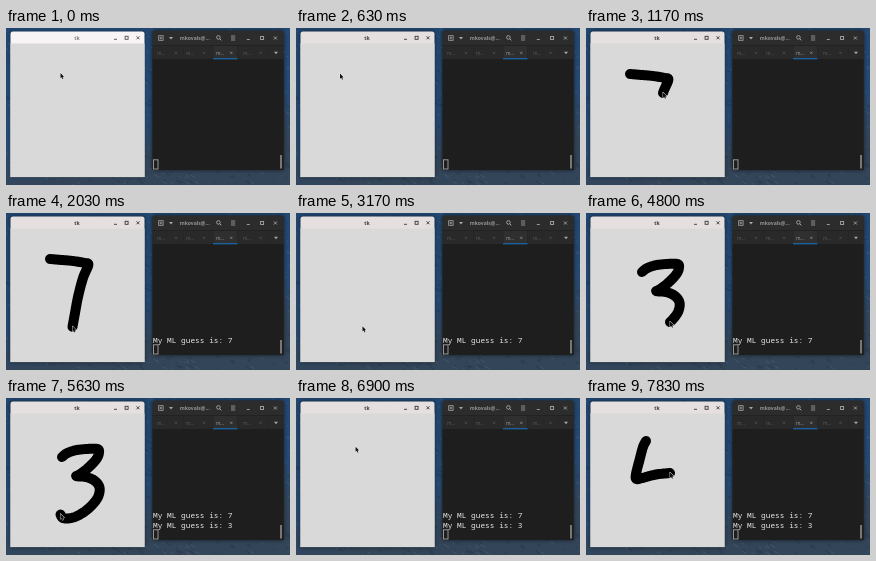
An HTML page with a canvas that plays this animation: 284 by 157 pixels, repeating every 8000 ms.

```html
<!DOCTYPE html>
<html lang="en">
<head>
<meta charset="utf-8">
<title>Digit guess</title>
<style>
html, body { margin: 0; width: 100%; height: 100%; overflow: hidden; background: #1f3a5c; }
canvas { display: block; width: 284px; height: 157px; }
</style>
</head>
<body>
<canvas id="stage"></canvas>
<script>
const W = 284, H = 157, LOOP = 8000, R = 5;
const canvas = document.getElementById('stage');
const dpr = window.devicePixelRatio || 1;
canvas.width = Math.round(W * dpr);
canvas.height = Math.round(H * dpr);
const g = canvas.getContext('2d');
g.scale(dpr, dpr);

const SANS = '"Open Sans", "Noto Sans", sans-serif';
const MONO = '"Noto Sans Mono", "DejaVu Sans Mono", monospace';

const rect = (x, y, w, h, c) => { g.fillStyle = c; g.fillRect(x, y, w, h); };

function line(points, color, width = 1) {
  g.strokeStyle = color;
  g.lineWidth = width;
  g.beginPath();
  points.forEach(([x, y], i) => i ? g.lineTo(x, y) : g.moveTo(x, y));
  g.stroke();
}

function text(s, x, y, font, color, align = 'left') {
  g.font = font;
  g.fillStyle = color;
  g.textAlign = align;
  g.fillText(s, x, y);
}

function triangle(x, y, color) {
  g.fillStyle = color;
  g.beginPath();
  g.moveTo(x - 2, y - 1);
  g.lineTo(x + 2, y - 1);
  g.lineTo(x, y + 1.5);
  g.fill();
}

function cross(x, y, r, color, width) {
  line([[x - r, y - r], [x + r, y + r]], color, width);
  line([[x + r, y - r], [x - r, y + r]], color, width);
}

function windowButtons(xs, y, color) {
  line([[xs[0] - 1.5, y + 1.5], [xs[0] + 1.5, y + 1.5]], color, 0.9);
  g.lineWidth = 0.9;
  g.strokeRect(xs[1] - 1.5, y - 1.5, 3, 3);
  cross(xs[2], y, 1.5, color, 0.9);
}

// Smooth curve through a few points, sampled with running length
function curve(points) {
  const out = [];
  const at = i => points[Math.max(0, Math.min(points.length - 1, i))];
  for (let i = 0; i < points.length - 1; i++) {
    const [a, b, c, d] = [at(i - 1), at(i), at(i + 1), at(i + 2)];
    for (let k = i ? 1 : 0; k <= 10; k++) {
      const u = k / 10;
      const p = [0, 1].map(j => 0.5 * (2 * b[j] + (c[j] - a[j]) * u +
        (2 * a[j] - 5 * b[j] + 4 * c[j] - d[j]) * u * u +
        (3 * b[j] - a[j] - 3 * c[j] + d[j]) * u * u * u));
      const q = out[out.length - 1];
      out.push([p[0], p[1], q ? q[2] + Math.hypot(p[0] - q[0], p[1] - q[1]) : 0]);
    }
  }
  return out;
}

function cut(path, f) {
  const len = path[path.length - 1][2] * f;
  const part = path.filter(p => p[2] <= len);
  const a = part[part.length - 1], b = path[part.length];
  if (b) {
    const u = (len - a[2]) / (b[2] - a[2]);
    part.push([a[0] + (b[0] - a[0]) * u, a[1] + (b[1] - a[1]) * u, len]);
  }
  return part;
}

// Share of n equal steps done at time t between a and b
function steps(t, a, b, n) {
  if (t < a) return 0;
  return t >= b ? 1 : Math.floor((t - a) / (b - a) * n) / n;
}

const strokes = [
  { clear: 3170, legs: [[770, 830, 3, 0.22], [1000, 1430, 13, 1]],
    path: curve([[44, 46], [56, 47], [67, 48], [79, 50], [82.3, 52], [77, 65], [72, 84], [69, 100], [66.5, 113.8]]) },
  { clear: 6230, legs: [[4030, 4830, 23, 0.82], [4870, 5000, 5, 1]],
    path: curve([[56, 59], [61, 55.2], [70, 52.2], [82, 50.9], [91.5, 51], [93, 54.5], [90.5, 61],
      [82, 70], [73.5, 76.5], [70.5, 78.2], [80, 79], [89, 83], [93.6, 90], [91.5, 100], [82.7, 110.3],
      [72.5, 117.3], [64, 120.2], [57, 120], [54.5, 116.5]]) },
  { clear: LOOP, legs: [[7300, 7830, 16, 1]],
    path: curve([[60, 43], [57, 49], [53.5, 62], [50, 76], [50.5, 81], [57, 79.8], [70, 76.5], [84, 75]]) }
];

const moves = [
  { a: 300, b: 630, n: 8, from: [54.5, 45.5], to: [44, 46], pow: 1.5 },
  { a: 3530, b: 3830, n: 10, from: [66.5, 113.8], to: [56, 59], pow: 1.5 },
  { a: 6600, b: 7100, n: 16, from: [54.5, 116.5], to: [60, 43], pow: 3 }
];

function progress(s, t) {
  let f = 0;
  for (const [a, b, n, end] of s.legs) if (t >= a) f += (end - f) * steps(t, a, b, n);
  return f;
}

function pointer(t) {
  let pos = moves[0].from;
  moves.forEach((m, i) => {
    if (t >= m.a) {
      const e = 1 - Math.pow(1 - steps(t, m.a, m.b, m.n), m.pow);
      pos = m.from.map((v, j) => v + (m.to[j] - v) * e);
    }
    const s = strokes[i];
    if (t >= s.legs[0][0]) pos = cut(s.path, progress(s, t)).pop();
  });
  return pos;
}

function drawPointer([x, y]) {
  const shape = [[0, 0], [0, 5.2], [1.2, 4.2], [2.1, 6.2], [2.9, 5.8], [2.1, 3.9], [3.5, 3.7]];
  g.beginPath();
  shape.forEach(([px, py], i) => g[i ? 'lineTo' : 'moveTo'](x + px, y - 0.5 + py));
  g.closePath();
  g.strokeStyle = 'rgba(240,240,240,.75)';
  g.lineWidth = 1;
  g.stroke();
  g.fillStyle = '#111';
  g.fill();
}

function wallpaper() {
  const sky = g.createLinearGradient(0, 0, 30, H);
  sky.addColorStop(0, '#21466f');
  sky.addColorStop(0.7, '#264a73');
  sky.addColorStop(1, '#334559');
  rect(0, 0, W, H, sky);
  let seed = 11;
  const rnd = () => (seed = seed * 16807 % 2147483647) / 2147483647;
  for (let i = 0; i < 700; i++) {
    const x = rnd() * W, y = rnd() * H, l = 1 + rnd() * 4;
    line([[x, y], [x + l, y + l * 0.6]], rnd() < 0.5 ? 'rgba(12,22,36,.3)' : 'rgba(125,145,165,.26)', 0.8);
  }
}

function panel(x, y, w, h, color, blur, shade) {
  g.save();
  g.shadowColor = `rgba(0,0,0,${shade})`;
  g.shadowBlur = blur * dpr;
  g.fillStyle = color;
  g.beginPath();
  g.roundRect(x, y, w, h, [2.5, 2.5, 0, 0]);
  g.fill();
  g.restore();
}

function sketchWindow(t) {
  const k = Math.max(0, Math.min(1, (t - 300) / 200));
  const mix = (a, b) => Math.round(a + (b - a) * k);
  const grey = (a, b) => `rgb(${mix(a, b)},${mix(a, b)},${mix(a, b)})`;
  panel(4.5, 3.5, 134, 145.6, `rgb(${mix(248, 230)},${mix(244, 223)},${mix(245, 224)})`, 3 + k, 0.35 + 0.2 * k);
  rect(4.5, 15.5, 134, 133.6, '#d9d9d9');
  text('tk', 71, 12, `bold 5.2px ${SANS}`, grey(125, 60), 'center');
  windowButtons([109.5, 120.6, 132], 9.8, grey(80, 55));
}

function terminal(t) {
  panel(146.5, 2.5, 131.2, 139.5, '#2c2c2c', 4, 0.6);
  const ink = '#a8a8a8';
  g.strokeStyle = ink;
  g.lineWidth = 0.8;
  g.strokeRect(152.7, 7.7, 4.4, 4.6);
  line([[154.9, 8.7], [154.9, 11.3]], ink, 0.8);
  line([[153.6, 10], [156.2, 10]], ink, 0.8);
  triangle(165, 10, ink);
  text('mkovals@…', 188.7, 12, `bold 5.1px ${SANS}`, '#929292', 'center');
  g.strokeStyle = ink;
  g.lineWidth = 0.9;
  g.beginPath();
  g.arc(212.4, 9.4, 1.8, 0, Math.PI * 2);
  g.stroke();
  line([[213.7, 10.7], [215.4, 12.4]], ink, 1);
  for (const y of [8, 10, 12]) line([[225, y], [229.2, y]], ink, 0.8);
  windowButtons([242.3, 256.1, 269.4], 10, ink);

  rect(146.5, 17.5, 131.2, 13.5, '#292929');
  rect(146.5, 17.3, 131.2, 0.6, '#1d1d1d');
  rect(207, 18, 24.5, 13, '#2f2f2f');
  [155, 184, 214, 241].forEach((x, i) => {
    const c = i === 2 ? '#a0a0a0' : '#5c5c5c';
    text('m…', x, 26.7, `4.8px ${SANS}`, c, 'center');
    cross([170, 198, 225.3, 254.5][i], 24.8, 1.1, c, 0.6);
  });
  for (const x of [177, 207, 231.5, 262]) rect(x, 18, 0.5, 12, '#222');
  triangle(270, 24.7, ink);

  rect(146.5, 31, 131.2, 111, '#1e1e1e');
  rect(207, 30, 24.5, 1.4, '#1b5f9f');
  rect(274, 127, 2, 13.5, '#777');

  const lines = [];
  if (t >= 2030) lines.push('My ML guess is: 7');
  if (t >= 5630) lines.push('My ML guess is: 3');
  lines.reverse().forEach((s, i) => text(s, 147, 129.5 - i * 10, `7.8px ${MONO}`, '#e6e6e6'));
  g.strokeStyle = '#a2a2a2';
  g.lineWidth = 0.9;
  g.strokeRect(147.5, 131.8, 4.5, 9.2);
}

function draw(t) {
  g.lineCap = 'butt';
  g.lineJoin = 'miter';
  wallpaper();
  terminal(t);
  sketchWindow(t);
  g.lineCap = g.lineJoin = 'round';
  for (const s of strokes) {
    if (t < s.legs[0][0] || t >= s.clear) continue;
    line(cut(s.path, progress(s, t)), '#000', R * 2);
  }
  drawPointer(pointer(t));
}

const start = performance.now();
function frame() {
  draw((performance.now() - start) % LOOP);
  requestAnimationFrame(frame);
}
frame();
</script>
</body>
</html>
```
